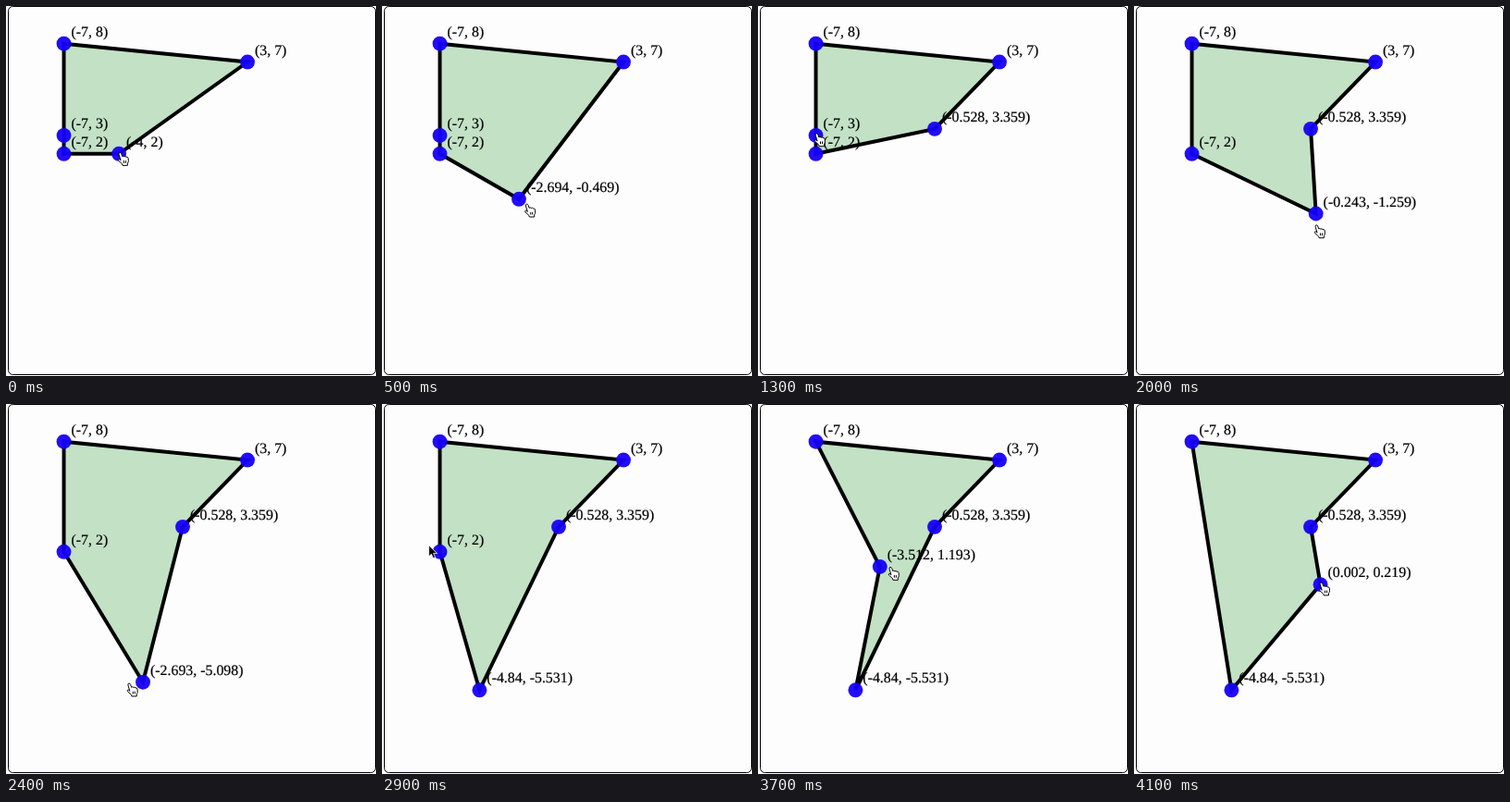
These frames come from a looping animation (400x400 px, 4.2 s). An HTML page:

```html
<!DOCTYPE html>
<html lang="en">
<head>
<meta charset="utf-8">
<title>Draggable polygon</title>
<style>
  html, body { margin: 0; width: 100%; height: 100%; overflow: hidden; background: #fff; }
  svg { display: block; width: 100%; height: 100%; }
  text { font: 16px "Liberation Serif", serif; stroke: #000; stroke-width: 0.2px; text-rendering: geometricPrecision; }
</style>
</head>
<body>
<svg viewBox="0 0 400 400">
  <rect x="2.5" y="0.5" width="397" height="398" rx="5" fill="#fdfdfd" stroke="#000"/>
  <g transform="translate(3 1) scale(0.9925)">
    <polygon id="shape" fill="#c3e1c5" stroke="#000" stroke-width="4"/>
    <g id="dots" fill="#1500f7" fill-opacity="0.95"></g>
    <g id="labels"></g>
    <path id="hand" fill="#fff" stroke="#000" stroke-linejoin="round"
      d="M3.6 9.2 L1.6 2.6 Q1.4 .9 2.7 .8 Q3.8 .7 4.3 2 L5.3 5 Q6.5 4 7.5 5.2 Q8.7 4.3 9.6 5.6 Q11.4 5.2 11.8 7 L12 10 Q11.8 11.4 11 12.6 L11 14.8 H5.6 L5.2 13.2 L1.2 9.6 Q.3 8.2 1.5 7.8 Q2.3 7.6 3.6 9.2 M7 9.5 V12.3 M9 9.5 V12.3"/>
    <path id="arrow" stroke="#fff" stroke-width="0.8" d="M0 0 V12 L2.8 9.5 L4.8 14 L7 13 L5 8.6 H9 Z"/>
  </g>
</svg>
<script>
const STEP = 100, STEPS = 42;
const LEAD = 0.5;        // steps by which the cursor runs ahead of its vertex
const GRIP = [-2, -3];   // cursor offset while dragging

const corners = [[-7, 8], [3, 7]];

// Paths hold [step, x, y] in graph units; hover is where the cursor waits before a drag.
const drags = [
  { path: [[0, -4, 2], [5, -2.694, -0.469], [7, -0.24, -1.85], [9, 2.17, 0.34], [11, -0.528, 3.359]],
    arrive: 0, hover: GRIP },
  { path: [[16, -7, 3], [20, -0.243, -1.259], [22, -0.4, -4.09], [26, -4.84, -5.531]],
    arrive: 13, hover: GRIP },
  { path: [[34, -7, 2], [37, -3.512, 1.193], [41, 0.002, 0.219]],
    arrive: 29, hover: [-12, -7] }
];

const el = id => document.getElementById(id);
const add = (parent, name) =>
  el(parent).appendChild(document.createElementNS("http://www.w3.org/2000/svg", name));
const count = corners.length + drags.length;
const dots = Array.from({ length: count }, () => add("dots", "circle"));
const labels = Array.from({ length: count }, () => add("labels", "text"));
const toPixels = ([x, y]) => [200 + 20 * x, 200 - 20 * y];
const plus = (a, b) => [a[0] + b[0], a[1] + b[1]];
const round = v => +v.toFixed(3);
const first = d => d.path[0];
const last = d => d.path[d.path.length - 1];

// Smooth curve through timed points, at rest at both ends and wherever an axis turns.
function along(path, t) {
  if (t <= path[0][0]) return path[0].slice(1);
  const i = path.findIndex(k => k[0] >= t);
  if (i < 0) return path[path.length - 1].slice(1);
  const a = path[i - 1], b = path[i], span = b[0] - a[0], u = (t - a[0]) / span;
  const slope = (k, axis) => (path[k + 1][axis] - path[k][axis]) / (path[k + 1][0] - path[k][0]);
  const tangent = (k, axis) => {
    if (k === 0 || k === path.length - 1) return 0;
    const p = slope(k - 1, axis), q = slope(k, axis);
    return p * q > 0 ? 2 * p * q / (p + q) : 0;
  };
  return [1, 2].map(axis =>
    a[axis] + (b[axis] - a[axis]) * u * u * (3 - 2 * u)
    + span * u * (1 - u) * (tangent(i - 1, axis) * (1 - u) - tangent(i, axis) * u));
}

// Vertices are joined by their angle around the mean point.
function byAngle(points) {
  const mean = j => points.reduce((sum, p) => sum + p[j], 0) / points.length;
  const cx = mean(0), cy = mean(1);
  const angle = p => Math.atan2(p[1] - cy, p[0] - cx);
  return [...points].sort((p, q) => angle(p) - angle(q));
}

function cursorAt(n) {
  const i = drags.findIndex(d => n <= last(d)[0]);
  const drag = drags[i], start = first(drag)[0];
  if (n >= start) return plus(toPixels(along(drag.path, n + LEAD)), GRIP);
  const prev = last(drags[i - 1]);
  const from = toPixels(prev.slice(1)), to = toPixels(first(drag).slice(1));
  return along([
    [prev[0], ...plus(from, GRIP)],
    [drag.arrive, ...plus(to, drag.hover)],
    [start, ...plus(to, GRIP)]
  ], n);
}

function set(node, attrs) {
  for (const key in attrs) node.setAttribute(key, attrs[key]);
}

function draw(time) {
  const n = Math.floor(time / STEP) % STEPS;
  const points = [...corners, ...drags.map(d => along(d.path, n))];
  set(el("shape"), { points: byAngle(points).map(toPixels).join(" ") });

  points.forEach((p, i) => {
    const [x, y] = toPixels(p);
    set(dots[i], { cx: x, cy: y, r: 8 });
    set(labels[i], { x: x + 8, y: y - 8 });
    labels[i].textContent = `(${round(p[0])}, ${round(p[1])})`;
  });

  const [cx, cy] = cursorAt(n);
  const dragging = drags.some(d => n >= first(d)[0] && n <= last(d)[0]);
  const over = points.map(toPixels).some(([x, y]) => Math.hypot(x - cx, y - cy) < 10);
  const hand = dragging || over;
  const transform = `translate(${cx} ${cy})`;
  set(el("hand"), { transform, visibility: hand ? "visible" : "hidden" });
  set(el("arrow"), { transform, visibility: hand ? "hidden" : "visible" });
}

const start = performance.now();
function tick() {
  draw(performance.now() - start);
  requestAnimationFrame(tick);
}
tick();
</script>
</body>
</html>
```
